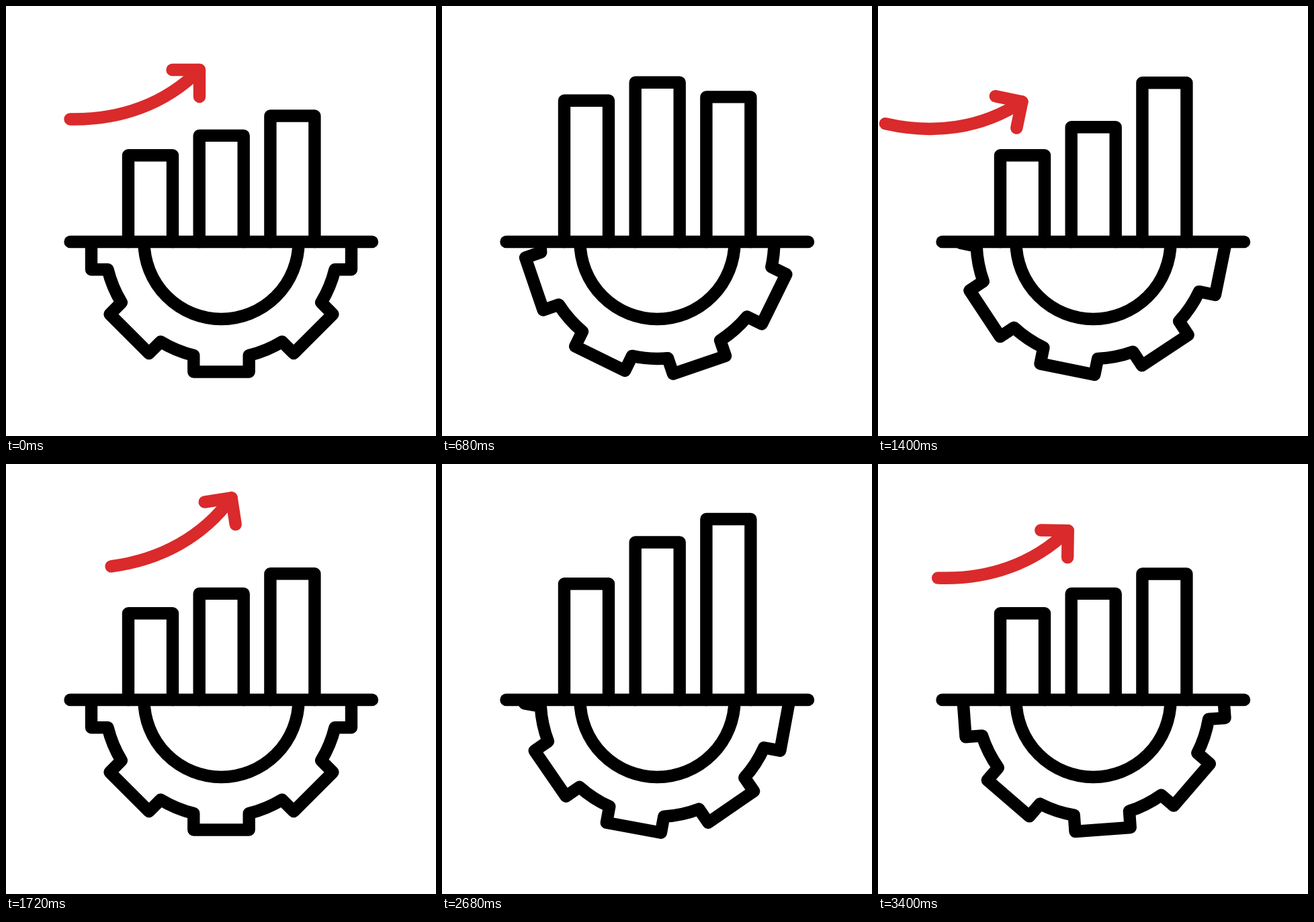
An HTML page with a canvas for the animation above (3.44 s loop, 640 by 640 pixels).

```html
<!DOCTYPE html>
<html lang="en">
<head>
<meta charset="utf-8">
<title>Growth gear</title>
<style>
html, body { margin: 0; width: 100%; height: 100%; overflow: hidden; background: #fff; }
canvas { display: block; width: 100%; height: 100%; }
</style>
</head>
<body>
<canvas id="stage" width="640" height="640"></canvas>
<script>
const ctx = document.getElementById('stage').getContext('2d');
const LOOP = 3440, STEP = 40, BAR_CYCLE = 1640;
const CX = 320.5, BASE = 351;
const PIVOT = { x: 21, y: -238 };
const RAD = Math.PI / 180;

const clamp = v => Math.min(1, Math.max(0, v));

// Cubic bezier easing with control points (a, 0) and (b, 1).
function ease(p, a = 1 / 3, b = 2 / 3) {
  p = clamp(p);
  let lo = 0, hi = 1;
  for (let i = 0; i < 24; i++) {
    const u = (lo + hi) / 2, v = 1 - u;
    if (3 * v * v * u * a + 3 * v * u * u * b + u * u * u < p) lo = u;
    else hi = u;
  }
  return lo * lo * (3 - 2 * lo);
}

function line(...pts) {
  ctx.beginPath();
  for (let i = 0; i < pts.length; i += 2) ctx.lineTo(pts[i], pts[i + 1]);
  ctx.stroke();
}

// The arrow swings round a far pivot; null means it is out of sight.
function arrowAngle(t) {
  const leave = start => -48 * ease((t - start) / 440);
  const enter = start => 43 * (1 - ease((t - start) / 700, 0.33, 0.8));
  if (t < 600) return leave(120);
  if (t < 900) return null;
  if (t < 1600) return enter(900);
  if (t < 2080) return leave(1600);
  if (t < 2740) return null;
  return enter(2740);
}

function drawArrow(t) {
  const angle = arrowAngle(t);
  if (angle === null) return;
  ctx.save();
  ctx.strokeStyle = '#da2a2b';
  ctx.translate(PIVOT.x, PIVOT.y);
  ctx.rotate(angle * RAD);
  ctx.translate(-PIVOT.x, -PIVOT.y);
  ctx.beginPath();
  ctx.moveTo(95.5, 168.5);
  ctx.bezierCurveTo(170, 170, 237, 146, 288, 95);
  ctx.stroke();
  line(247.5, 95, 288, 95, 288, 135);
  ctx.restore();
}

function barLift(t, i) {
  const local = t < 1760 ? t : t - BAR_CYCLE;
  const up = ease((local - 132 - 197 * i) / 390);
  const down = ease((local - 756 - 193 * i) / 600);
  return 81.5 * (up - down);
}

function drawBars(t) {
  for (let i = 0; i < 3; i++) {
    const x = 182 + 105.7 * i;
    const top = 222.3 - 29.4 * i - barLift(t, i);
    line(x, BASE, x, top, x + 66, top, x + 66, BASE);
  }
}

function drawGear(t) {
  const half = 41.2, root = 169, tip = 193.5;
  const r = Math.hypot(root, half), a = Math.atan2(half, root);
  ctx.save();
  ctx.beginPath();
  ctx.rect(0, BASE, 640, 640 - BASE);
  ctx.clip();
  ctx.translate(CX, BASE);
  ctx.beginPath();
  ctx.arc(0, 0, 115, 0, Math.PI * 2);
  ctx.stroke();
  ctx.rotate(t / LOOP * Math.PI * 2);
  ctx.beginPath();
  for (let k = 0; k < 8; k++) {
    ctx.lineTo(root, -half);
    ctx.lineTo(tip, -half);
    ctx.lineTo(tip, half);
    ctx.lineTo(root, half);
    ctx.arc(0, 0, r, a, Math.PI / 4 - a);
    ctx.rotate(Math.PI / 4);
  }
  ctx.closePath();
  ctx.stroke();
  ctx.restore();
}

function draw(t) {
  ctx.fillStyle = '#fff';
  ctx.fillRect(0, 0, 640, 640);
  ctx.strokeStyle = '#000';
  ctx.lineWidth = 18.4;
  ctx.lineCap = ctx.lineJoin = 'round';
  drawGear(t);
  drawBars(t);
  line(95.5, BASE, 545, BASE);
  drawArrow(t);
}

function tick() {
  const t = performance.now() % LOOP;
  draw(Math.floor(t / STEP) * STEP);
  requestAnimationFrame(tick);
}
tick();
</script>
</body>
</html>
```
